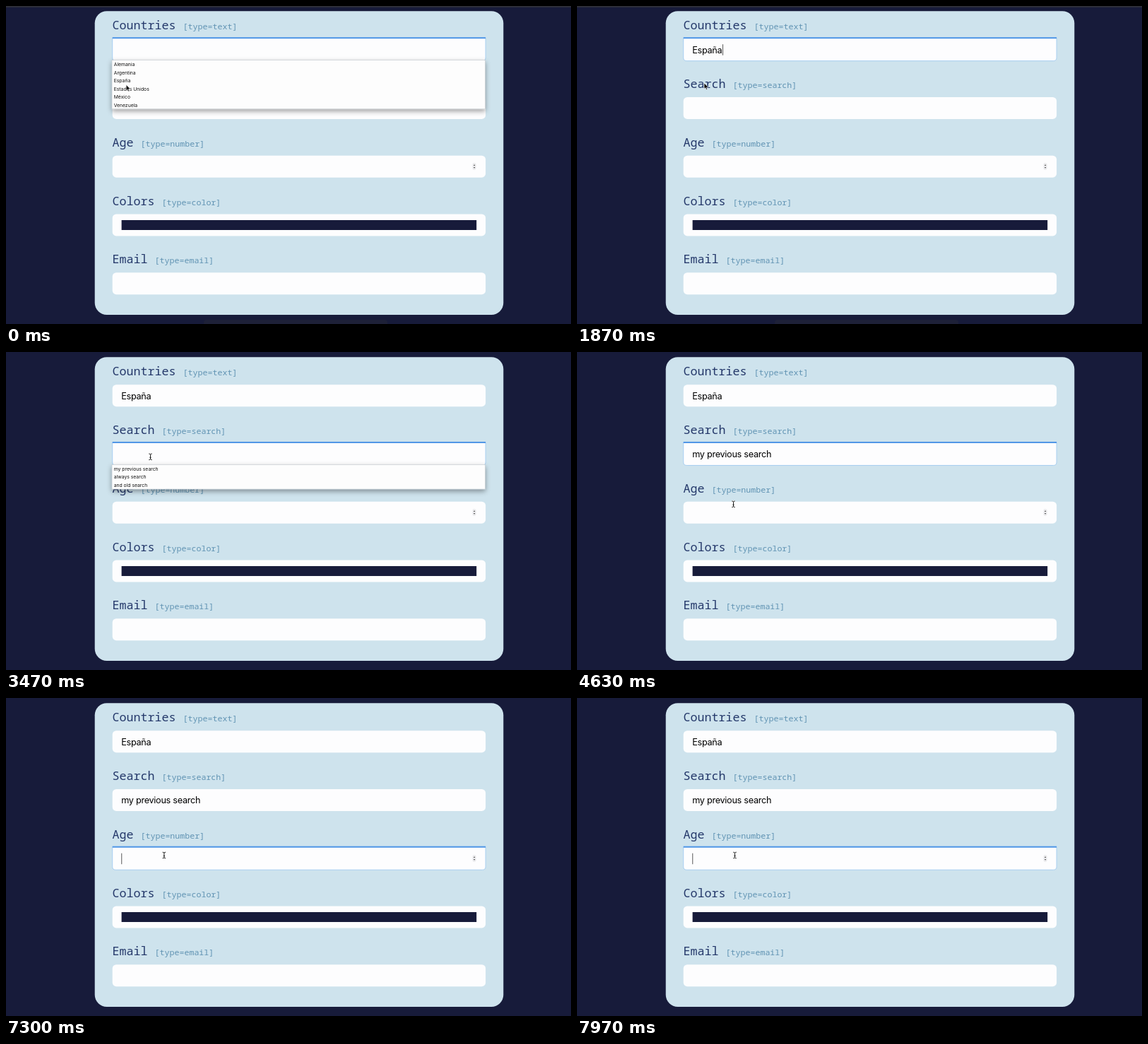
An HTML page for the animation above (8000 ms loop, 800 by 450 pixels).

```html
<!DOCTYPE html>
<html lang="en">
<head>
<meta charset="utf-8">
<title>Form inputs</title>
<style>
  html, body { margin: 0; width: 100%; height: 100%; overflow: hidden; background: #171b3a; }
  svg { display: block; width: 100vw; height: 100vh; }
  text { white-space: pre; }
  .label { font: 16.7px "Noto Sans Mono", monospace; fill: #24386a; }
  .type { font: 11.65px "Noto Sans Mono", monospace; fill: #6093b3; }
  .value { font: 12.7px Inter, sans-serif; letter-spacing: -.3px; fill: #000; }
  .option { font: 6.8px Inter, sans-serif; fill: #111; }
</style>
</head>
<body>
<svg id="stage" viewBox="0 0 800 450">
  <defs>
    <filter id="shadow" x="-5%" y="-30%" width="110%" height="170%">
      <feDropShadow dx="0" dy="3" stdDeviation="3.5" flood-color="#000" flood-opacity=".38"/>
    </filter>
  </defs>
  <rect width="800" height="450" fill="#171b3a"/>
  <g id="chrome">
    <rect width="800" height="2" fill="#2d2e39"/>
    <rect x="280" y="444" width="260" height="12" rx="4" fill="#1e2138"/>
  </g>
  <rect x="125.7" y="7.3" width="578.6" height="429.8" rx="17" fill="#cee3ed"/>
  <g id="form"></g>
  <g id="popups"></g>
  <g id="arrow">
    <path d="M0 0V8.3L1.9 6.6 3.1 9.4 4.5 8.8 3.3 6.1H5.9Z" fill="#000" stroke="#fff" stroke-width=".6"/>
  </g>
  <g id="beam" fill="none">
    <path id="beamHalo" stroke="#fff" stroke-width="1.9"/>
    <path id="beamLine" stroke="#111" stroke-width=".95"/>
  </g>
</svg>
<script>
const NS = "http://www.w3.org/2000/svg";
const LOOP = 8000, LEFT = 150.7, WIDTH = 528.4, HEIGHT = 31;
const $ = id => document.getElementById(id);
const fieldTop = i => 46.2 + 82.75 * i;

function add(parent, tag, attrs, text) {
  const el = document.createElementNS(NS, tag);
  for (const k in attrs) el.setAttribute(k, attrs[k]);
  if (text) el.textContent = text;
  return parent.appendChild(el);
}
const show = (el, on) => el.setAttribute("visibility", on ? "visible" : "hidden");

function makeField([name, type], i) {
  const y = fieldTop(i), form = $("form");
  add(form, "text", { class: "label", x: 150.5, y: y - 12.8 }, name);
  add(form, "text", { class: "type", x: 250.6 - (9 - name.length) * 10.02, y: y - 12.9 }, `[type=${type}]`);
  add(form, "rect", { x: LEFT, y, width: WIDTH, height: HEIGHT, rx: 5.5, fill: "#fdfdfe" });
  const ring = add(form, "g", {});
  add(ring, "path", {
    d: `M${LEFT} ${y - 1}h${WIDTH}v${HEIGHT - 3}q0 4.5 -4.5 4.5h${9 - WIDTH}q-4.5 0 -4.5 -4.5z`,
    fill: "#fdfdfe", stroke: "#a5cdf0", "stroke-width": 1
  });
  add(ring, "rect", { x: LEFT, y: y - 2, width: WIDTH, height: 2, fill: "#4f96e6" });
  const value = add(form, "text", { class: "value", x: 163.2, y: y + 20.3 });
  const caret = add(form, "rect", { y: y + 8, width: .8, height: 15.5, fill: "#333" });
  return { ring, value, caret };
}

function makePopup(i, options) {
  const y = fieldTop(i) + 30.4, g = add($("popups"), "g", {});
  add(g, "rect", {
    x: 150, y, width: 528.7, height: options.length * 11.5 + .2,
    fill: "#fdfdfd", stroke: "#b4bcc2", "stroke-width": .5, filter: "url(#shadow)"
  });
  options.forEach((o, k) => add(g, "text", { class: "option", x: 152.7, y: y + 8.4 + 11.5 * k }, o));
  return g;
}

const fields = [
  ["Countries", "text"], ["Search", "search"], ["Age", "number"],
  ["Colors", "color"], ["Email", "email"]
].map(makeField);

add($("form"), "rect", { x: 163.6, y: 303, width: 502.6, height: 14, fill: "#171b3a" });
add($("form"), "rect", { x: 660.4, y: 222, width: 5.2, height: 10, rx: 2.4, fill: "#ececee" });
add($("form"), "path", { d: "M661.8 226.1l1.3-1.8 1.3 1.8zM661.8 228l1.3 1.8 1.3-1.8z", fill: "#555" });

const countryList = makePopup(0, ["Alemania", "Argentina", "España", "Estados Unidos", "México", "Venezuela"]);
const searchList = makePopup(1, ["my previous search", "always search", "and old search"]);

const beamPath = "M-2.2 -4.3Q0 -4.3 0 -3Q0 -4.3 2.2 -4.3M0 -3V3M-2.2 4.3Q0 4.3 0 3Q0 4.3 2.2 4.3M-1.1 1H1.1";
$("beamHalo").setAttribute("d", beamPath);
$("beamLine").setAttribute("d", beamPath);

// Moments of the interaction, in ms
const PICK_COUNTRY = 1400, FOCUS_SEARCH = 2850, OPEN_SEARCH = 3250,
      PICK_SEARCH = 4000, FOCUS_AGE = 4900, HIDE_CHROME = 2930;

// Pointer stops: time, x, y
const path = [
  [0, 170.2, 111.5], [500, 170.2, 111.5], [1000, 172, 105.5], [1600, 172, 105.5],
  [1870, 180, 109], [2600, 203, 146], [2850, 204.5, 148.3], [3500, 204.5, 148.3],
  [3850, 206, 165], [4150, 206, 165], [4630, 221.5, 215.3], [4850, 223.5, 224],
  [5970, 223.5, 224], [6500, 223.9, 222.5], [7300, 223.9, 222.5], [7970, 223.5, 222.5],
  [LOOP, 223.5, 222.5]
];

function pointerAt(t) {
  const i = path.findIndex(p => p[0] > t);
  const [t0, x0, y0] = path[i - 1], [t1, x1, y1] = path[i];
  const u = (t - t0) / (t1 - t0), e = u * u * (3 - 2 * u);
  return [x0 + (x1 - x0) * e, y0 + (y1 - y0) * e];
}

function draw(t) {
  const countryOpen = t < PICK_COUNTRY;
  const searchOpen = t >= OPEN_SEARCH && t < PICK_SEARCH;
  const focus = t < FOCUS_SEARCH ? 0 : t < FOCUS_AGE ? 1 : 2;
  const since = t - (countryOpen ? -500 : t < FOCUS_SEARCH ? PICK_COUNTRY :
    t < PICK_SEARCH ? FOCUS_SEARCH : t < FOCUS_AGE ? PICK_SEARCH : FOCUS_AGE);
  const values = [countryOpen ? "" : "España", t < PICK_SEARCH ? "" : "my previous search"];
  const caretX = [countryOpen ? 163.4 : 206, t < PICK_SEARCH ? 163.4 : 275.6, 163.4];

  fields.forEach((f, i) => {
    f.value.textContent = values[i] || "";
    f.caret.setAttribute("x", caretX[i] || 163.4);
    show(f.ring, i === focus);
    show(f.caret, i === focus && since % 1000 < 500);
  });
  show(countryList, countryOpen);
  show(searchList, searchOpen);
  show($("chrome"), t < HIDE_CHROME);

  const [x, y] = pointerAt(t);
  const inField = fields.some((f, i) => y > fieldTop(i) && y < fieldTop(i) + HEIGHT);
  const onList = countryOpen || (searchOpen && y > 159);
  const beam = inField && !onList;
  show($("beam"), beam);
  show($("arrow"), !beam);
  $(beam ? "beam" : "arrow").setAttribute("transform", `translate(${x} ${y})`);
}

const start = performance.now();
function tick() {
  draw((performance.now() - start) % LOOP);
  requestAnimationFrame(tick);
}
tick();
</script>
</body>
</html>
```
